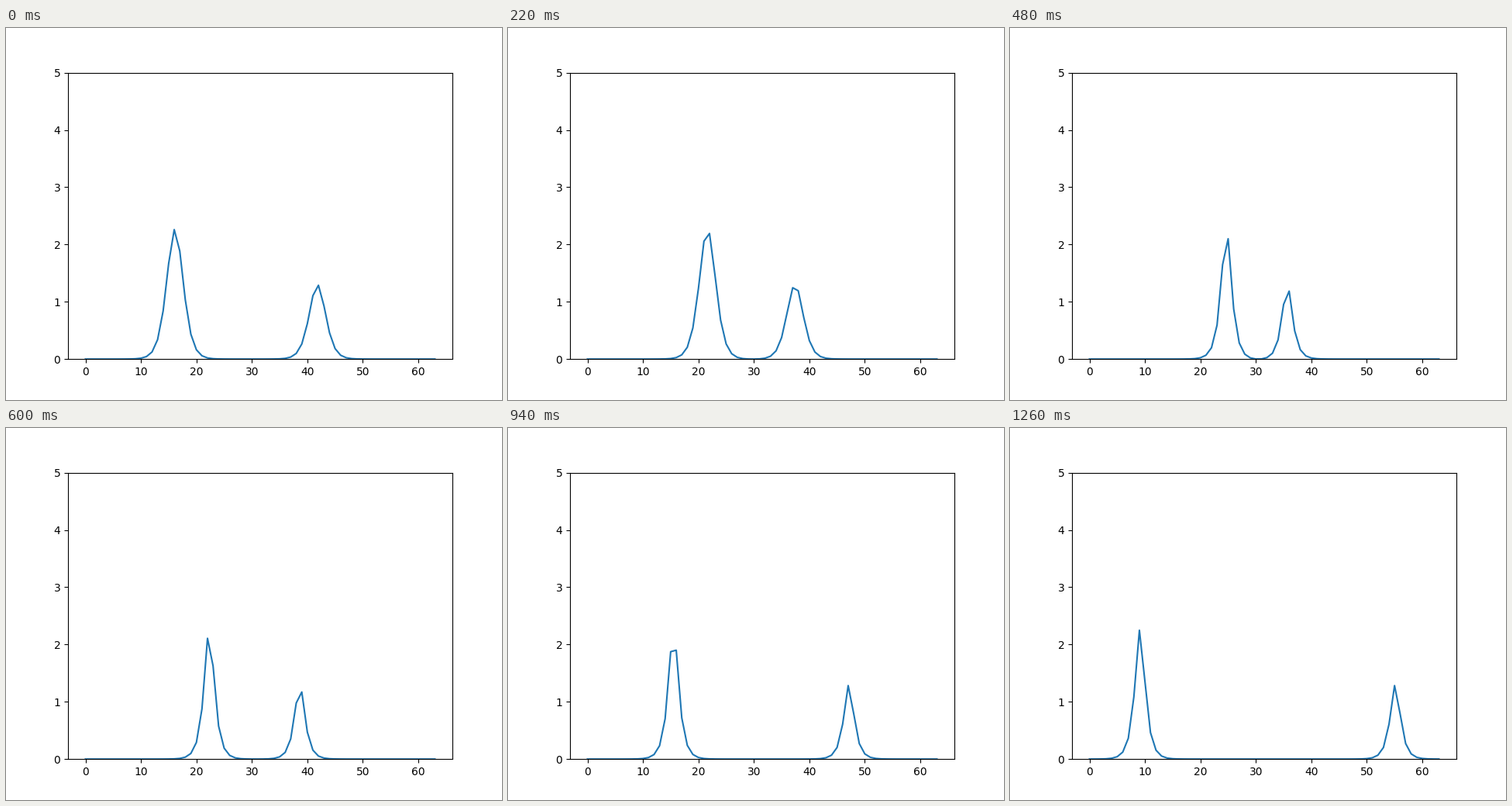
Write a matplotlib script that moves like this. It is 640x480 px and loops after 1280 ms.

```python
import numpy as np
import matplotlib.pyplot as plt
from matplotlib.animation import FuncAnimation

FRAMES = 64
INTERVAL = 20

K = 1.06                  # decay rate of the tails
H_LEFT, H_RIGHT = 2.27, 1.30
T_HIT, X_HIT = 20.2, 29.98
DRIFT, SPEED = 0.05, 0.45  # motion of the midpoint and of the separation
GAP = 3.75

x = np.arange(64)


def pulses(t):
    """Two solitons that repel each other, with a node between them."""
    dt = t - T_HIT
    xi = K * (x - X_HIT - DRIFT * dt)
    s = K * SPEED * dt

    flat = 0.48 - 0.77 * np.tanh(s + 0.35)        # broad before, narrow after
    boost = 1 + 0.97 / np.cosh(2 * s) ** 2        # peaks grow on impact
    ratio = np.cosh(xi) / (np.exp(K * GAP) * np.cosh(s))

    wave = (np.sqrt(H_LEFT) * np.exp(-xi / 2)
            - np.sqrt(H_RIGHT) * np.exp(xi / 2)) ** 2
    height = boost * wave / (2 * np.cosh(xi))
    return height * 2 * (1 + flat) / (ratio + 1 / ratio + 2 * flat)


fig, ax = plt.subplots(figsize=(6.4, 4.8), dpi=100)
line, = ax.plot(x, pulses(0))
ax.set_ylim(0, 5)


def update(i):
    line.set_ydata(pulses(i))
    return line,


anim = FuncAnimation(fig, update, frames=FRAMES, interval=INTERVAL,
                     repeat=True, repeat_delay=0)
plt.show()
```
